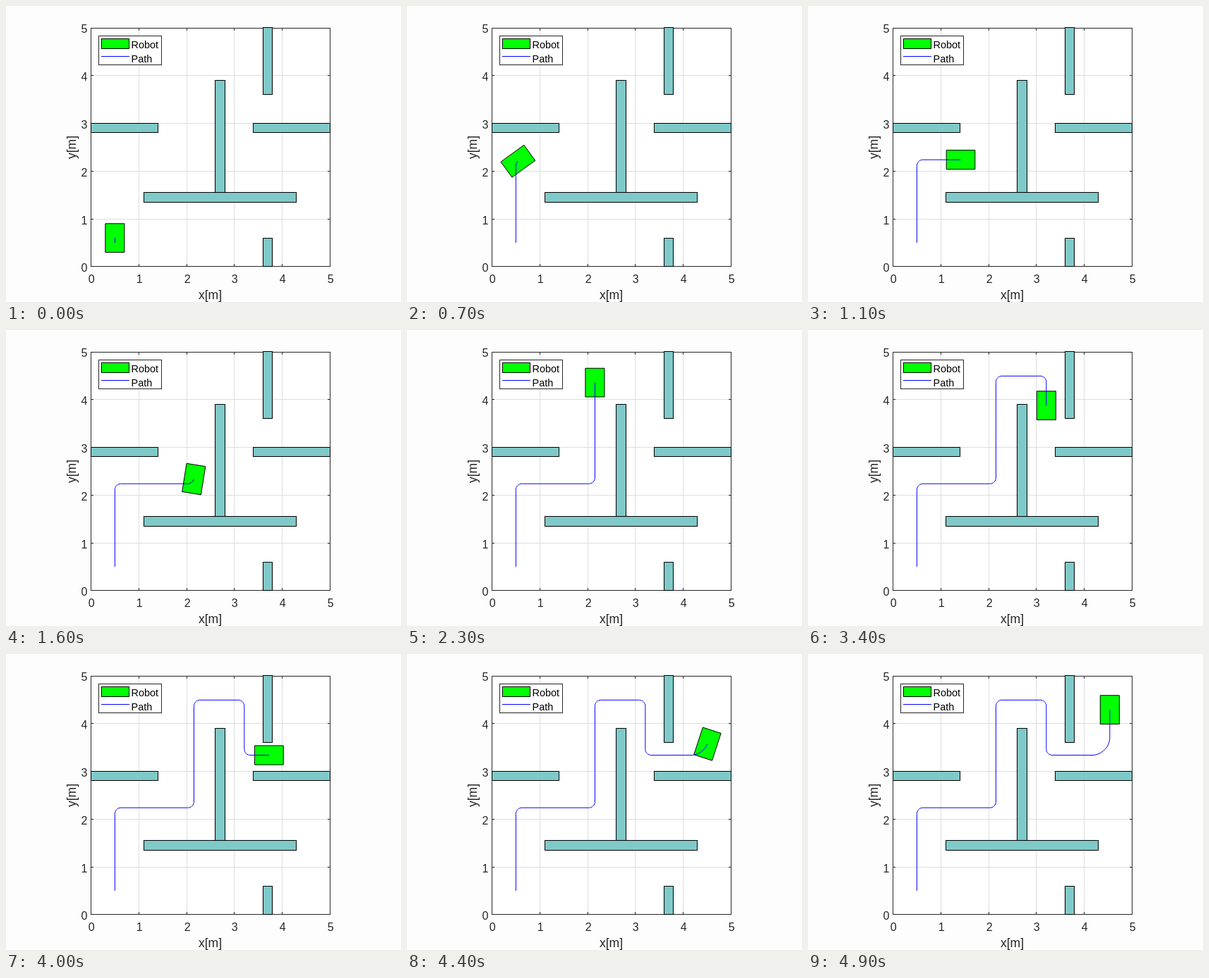
These frames come from a looping animation (560 by 420 pixels, 5100 ms). An HTML page:

```html
<!DOCTYPE html>
<html lang="en">
<head>
<meta charset="utf-8">
<title>Robot path</title>
<style>
  html, body { margin: 0; width: 100%; height: 100%; overflow: hidden; background: #fdfdfd; }
  svg { display: block; width: 560px; height: 420px; }
  text { font-family: "Liberation Sans", Arial, sans-serif; font-size: 16px; fill: #262626; }
  .mid { text-anchor: middle; }
  .end { text-anchor: end; }
  .label { font-size: 17.6px; }
  .key { font-size: 14.4px; fill: #000; }
  .grid { stroke: #dedede; }
  .axis { stroke: #262626; fill: none; }
  .wall { fill: #7fc9c9; stroke: #000; }
  .robot { fill: #0f0; stroke: #000; }
  .path { fill: none; stroke: #00f; stroke-linejoin: round; }
</style>
</head>
<body>
<svg id="stage" viewBox="0 0 560 420">
  <rect x="120.5" y="31.5" width="339" height="338" fill="#fff"/>
  <g id="grid"></g>
  <rect class="axis" x="120.5" y="31.5" width="339" height="338"/>
  <g id="walls"></g>
  <polygon id="robot" class="robot"/>
  <polyline id="path" class="path"/>
  <rect x="131.5" y="42.5" width="89" height="41" fill="#fff" stroke="#262626"/>
  <rect class="robot" x="135.5" y="46.5" width="39" height="14"/>
  <path class="path" d="M135 71.5H175"/>
  <text class="key" x="177.6" y="59.5">Robot</text>
  <text class="key" x="177.6" y="79.5">Path</text>
  <text class="label mid" x="289.5" y="416">x[m]</text>
  <text class="label mid" transform="translate(99 200.5) rotate(-90)">y[m]</text>
</svg>
<script>
const LOOP = 5100, FRAME = 100, LAST = 49, STEPS_PER_FRAME = 3;
const LEFT = 120.5, BASE = 369.82, SCALE_X = 67.75, SCALE_Y = 67.8;
const $ = id => document.getElementById(id);

const px = (x, y) => [LEFT + x * SCALE_X, BASE - y * SCALE_Y];
const crisp = (x, y) => px(x, y).map(v => Math.floor(v) + 0.5);
const rad = deg => deg * Math.PI / 180;

function add(parent, tag, attrs, text = "") {
  const el = document.createElementNS("http://www.w3.org/2000/svg", tag);
  for (const key in attrs) el.setAttribute(key, attrs[key]);
  el.textContent = text;
  $(parent).append(el);
}

// Grid, tick marks and numbers
for (let i = 0; i <= 5; i++) {
  const [x, y] = crisp(i, i);
  if (i % 5) {
    add("grid", "path", { class: "grid", d: `M${x} 32V369M121 ${y}H459` });
    add("grid", "path", {
      class: "axis",
      d: `M${x} 31v4M${x} 370v-4M120 ${y}h4M460 ${y}h-4`
    });
  }
  add("stage", "text", { class: "mid", x: x + 0.7, y: 392.5 }, i);
  add("stage", "text", { class: "end", x: 115.5, y: y + 7 }, i);
}

// Walls: a corner and a length in metres, all equally thick
const THICK = 0.2;
function wall(x, y, w, h) {
  const [l, b] = crisp(x, y), [r, t] = crisp(x + w, y + h);
  add("walls", "rect", { class: "wall", x: l, y: t, width: r - l, height: b - t });
}
const across = (x, y, length) => wall(x, y, length, THICK);
const upright = (x, y, length) => wall(x, y, THICK, length);

across(0, 2.8, 1.4);
across(3.4, 2.8, 1.6);
upright(3.6, 0, 0.6);
upright(3.6, 3.6, 1.4);
upright(2.6, 1.55, 2.35);
across(1.1, 1.35, 3.2);

// The robot drives straight in 0.1 m steps and turns 90° in ten smaller ones
function drive() {
  let x = 0.5, y = 0.5, dir = 90;
  const poses = [{ x, y, dir }];
  const go = (count, dist, turn) => {
    for (let i = 0; i < count; i++) {
      x += dist * Math.cos(rad(dir));
      y += dist * Math.sin(rad(dir));
      dir += turn;
      poses.push({ x, y, dir });
    }
  };
  const straight = count => go(count, 0.1, 0);
  const right = () => go(10, 0.02, -9);
  const left = (dist = 0.02) => go(10, dist, 9);

  straight(16); right();
  straight(14); left();
  straight(20); right();
  straight(8); right();
  straight(9); left();
  straight(8); left(0.06);
  straight(6);
  return poses;
}

const poses = drive();

function outline({ x, y, dir }) {
  const c = Math.cos(rad(dir)), s = Math.sin(rad(dir));
  const corner = (u, v) => px(x + u * c - v * s, y + u * s + v * c);
  return [corner(0.3, 0.2), corner(0.3, -0.2), corner(-0.3, -0.2), corner(-0.3, 0.2)].join(" ");
}

// Straight runs keep only their ends
function trail(step) {
  return poses.slice(0, step + 1)
    .filter((p, i, all) => p.dir !== all[i - 1]?.dir || p.dir !== all[i + 1]?.dir)
    .map(p => px(p.x, p.y))
    .join(" ");
}

let shown = -1;
function draw(time) {
  const frame = Math.min(LAST, Math.floor((time % LOOP) / FRAME));
  if (frame === shown) return;
  shown = frame;
  const step = Math.min(poses.length - 1, frame * STEPS_PER_FRAME + 1);
  $("robot").setAttribute("points", outline(poses[step]));
  $("path").setAttribute("points", trail(step));
}

const start = performance.now();
function tick() {
  draw(performance.now() - start);
  requestAnimationFrame(tick);
}
tick();
</script>
</body>
</html>
```
